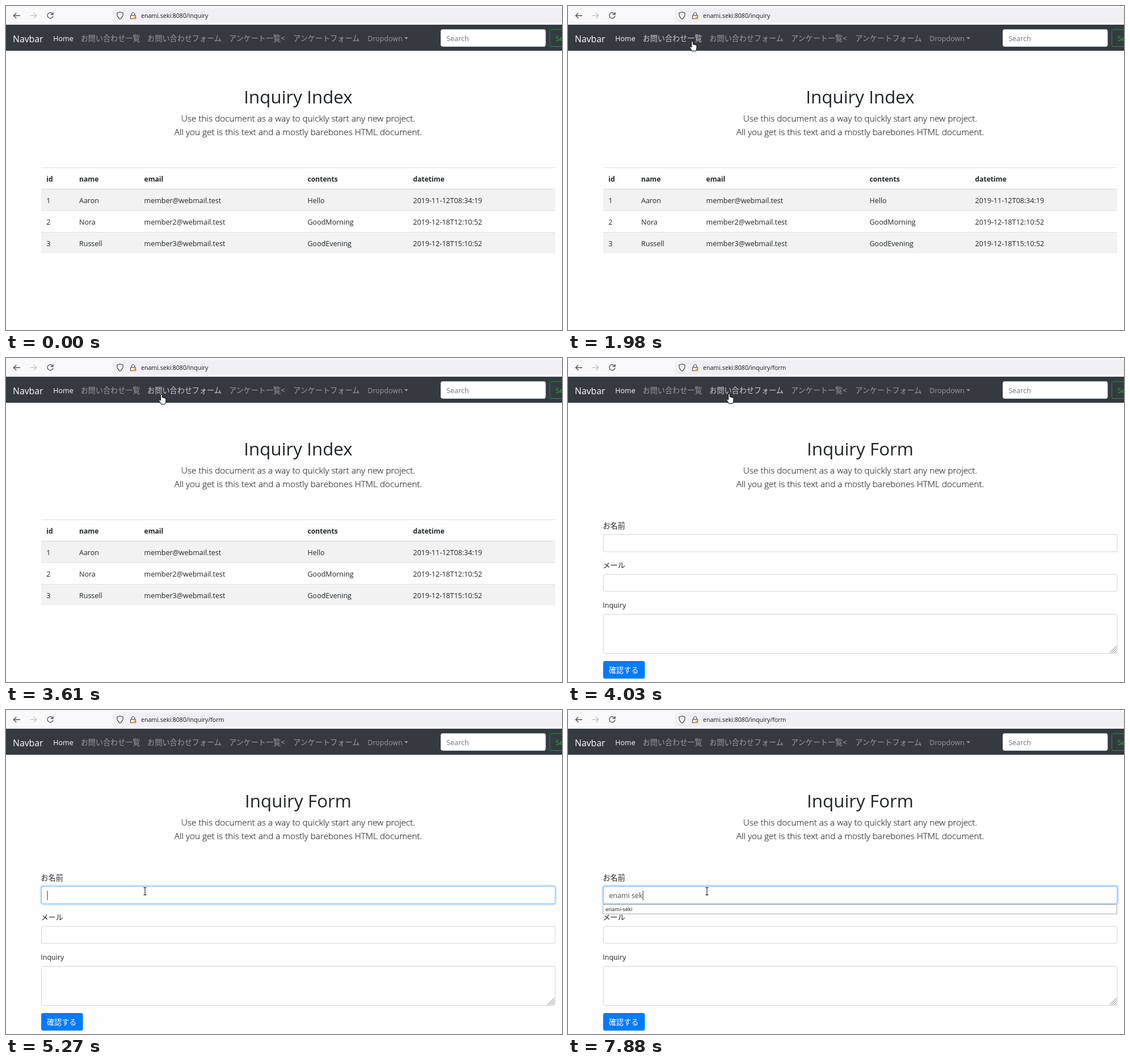
Write an HTML page that moves like this. It is 980 px wide and 572 px high and loops after 8 s.

```html
<!DOCTYPE html>
<html lang="ja">
<head>
<meta charset="utf-8">
<title>Inquiry</title>
<style>
  html, body { margin: 0; width: 100%; height: 100%; overflow: hidden; background: #fefefe; }
  svg { display: block; width: 980px; height: 572px; }
  text { font: 12.5px "Open Sans", "Noto Sans CJK JP", "Noto Sans CJK", sans-serif; fill: #212529; white-space: pre; }
  .jp { font-family: "Noto Sans CJK JP", "Noto Sans CJK", sans-serif; font-size: 13.1px; }
  .url { font-size: 10.6px; fill: #15141a; }
  .brand { font-size: 15.8px; font-weight: 500; fill: #fff; }
  .nav text { fill: #999ca0; }
  .nav .hover { fill: #cccecf; }
  .nav .active { font-weight: 500; fill: #fff; }
  .title { font-size: 31.3px; text-anchor: middle; }
  .lead { font-size: 15.35px; font-weight: 300; text-anchor: middle; stroke: #212529; stroke-width: .15; }
  .head { font-size: 12.1px; font-weight: 700; }
  .field { fill: #fff; stroke: #ced4da; }
  .icon { fill: none; stroke: #4d4d57; stroke-width: 1.3; stroke-linecap: round; stroke-linejoin: round; }
  .pointer { fill: #fff; stroke: #000; stroke-linejoin: round; }
</style>
</head>
<body>
<svg viewBox="0 0 980 572">
  <rect width="980" height="572" fill="#fefefe"/>

  <!-- browser toolbar -->
  <rect width="980" height="33" fill="#f9f9fb"/>
  <rect x="188" y="4" width="800" height="25" rx="3.5" fill="#f0f0f4"/>
  <g class="icon">
    <path d="M24.5 17H13.5M18 12.5L13.5 17L18 21.5"/>
    <path d="M43 17H54M49.5 12.5L54 17L49.5 21.5" stroke="#c3c3c8"/>
    <path d="M82.3 14.2A5 5 0 1 0 82.8 18M83 11.5V15H79.3"/>
    <path d="M201 10.5L206.3 12.3Q206.5 20 201 23Q195.5 20 195.7 12.3Z"/>
    <path d="M219.5 16.5H228.5V22.5H219.5ZM221.3 16.5V13.5Q224 9 226.7 13.5V16.5" stroke-width="1.1"/>
    <path d="M226.5 18.5L229.5 23H223.5Z" fill="#e8a33d" stroke="#e8a33d" stroke-width=".6"/>
  </g>
  <text class="url" id="url" x="238" y="20.7"></text>

  <!-- site navigation -->
  <rect y="33" width="980" height="46" fill="#343a40"/>
  <text class="brand" x="12" y="63.5">Navbar</text>
  <g class="nav">
    <text class="active" x="83.3" y="62">Home</text>
    <text class="jp" id="listLink" x="131.7" y="62">お問い合わせ一覧</text>
    <text class="jp" id="formLink" x="249.3" y="62">お問い合わせフォーム</text>
    <text class="jp" x="393" y="62">アンケート一覧&lt;</text>
    <text class="jp" x="506.3" y="62">アンケートフォーム</text>
    <text x="637.3" y="62">Dropdown</text>
    <path d="M702 55.3H709L705.5 58.8Z" fill="#999ca0"/>
  </g>
  <rect class="field" x="766.5" y="41.5" width="184.5" height="30" rx="3"/>
  <text x="776.5" y="62" style="fill:#6c757d">Search</text>
  <rect x="958.5" y="41.5" width="60" height="30" rx="3" fill="none" stroke="#28a745" stroke-width=".8"/>
  <text x="968.5" y="62" style="fill:#28a745">Search</text>

  <text class="title" id="title" x="515" y="171.5"></text>
  <text class="lead" x="515" y="203.5">Use this document as a way to quickly start any new project.</text>
  <text class="lead" x="515" y="228">All you get is this text and a mostly barebones HTML document.</text>

  <g id="table">
    <path d="M62 323h906v38.5h-906zM62 399h906v37.5h-906z" fill="#f2f2f2"/>
    <path d="M62 285.5H968M62 361.5H968M62 399.5H968" stroke="#dee2e6"/>
    <path d="M62 323.3H968" stroke="#dee2e6" stroke-width="1.6"/>
  </g>

  <g id="form">
    <text class="jp" x="61.5" y="300.5">お名前</text>
    <rect class="field" x="62.5" y="311.5" width="905.5" height="30.5" rx="3"/>
    <text class="jp" x="61.5" y="371">メール</text>
    <rect class="field" x="62.5" y="382" width="905.5" height="30" rx="3"/>
    <text x="61.3" y="441">Inquiry</text>
    <rect class="field" x="62.5" y="452.5" width="905.5" height="69" rx="3"/>
    <path d="M955 520.5L967 508.5M959 520.5L967 512.5M963 520.5L967 516.5" stroke="#666"/>
    <rect x="62" y="535" width="73.5" height="31" rx="3.3" fill="#007bff"/>
    <text class="jp" x="72" y="556" style="fill:#fff">確認する</text>
    <g id="focus" fill="none">
      <rect x="61" y="310" width="908.5" height="33.5" rx="4.5" stroke="#bfdeff" stroke-width="2.4"/>
      <rect x="62.5" y="311.5" width="905.5" height="30.5" rx="3" stroke="#80bdff"/>
    </g>
    <text id="typed" x="72.3" y="332" style="fill:#495057"></text>
    <rect id="caret" y="319" width="1" height="17" fill="#333"/>
    <g id="suggestion">
      <rect x="61.5" y="343.5" width="906" height="16.5" fill="#fff" stroke="#a9a9ae"/>
      <text x="66" y="355.3" style="font-size:9.4px;fill:#111">enami-seki</text>
    </g>
  </g>

  <g id="cursor">
    <path id="arrow" class="pointer" d="M0 0V14L3.3 11L5.5 16.5L7.8 15.5L5.5 10.3H10Z"/>
    <path id="hand" class="pointer" d="M-1.4 1.2Q0 -.8 1.4 1.2V6Q2.5 5 3.9 6.4Q5.2 5.6 6.1 7Q7.6 6.6 7.9 8.3V12Q7.8 15 6.2 17.5H-.6Q-2 14 -4.3 11.4Q-5 9.4 -3 9.6L-1.4 11Z"/>
    <path id="beam" d="M-2.5 -6.5H2.5M0 -6.5V6.5M-2.5 6.5H2.5" stroke="#000"/>
  </g>
</svg>

<script>
  const LOOP = 8000;
  const FORM_OPENS = 3890;
  const $ = id => document.getElementById(id);
  const show = (id, visible) => $(id).style.display = visible ? '' : 'none';
  const setText = (id, value) => { if ($(id).textContent !== value) $(id).textContent = value; };
  const clamp = v => Math.min(1, Math.max(0, v));

  const columns = [71.3, 129, 243.5, 531.5, 717.5];
  const rows = [
    ['id', 'name', 'email', 'contents', 'datetime'],
    ['1', 'Aaron', 'member@webmail.test', 'Hello', '2019-11-12T08:34:19'],
    ['2', 'Nora', 'member2@webmail.test', 'GoodMorning', '2019-12-18T12:10:52'],
    ['3', 'Russell', 'member3@webmail.test', 'GoodEvening', '2019-12-18T15:10:52']
  ];
  rows.forEach((cells, row) => cells.forEach((value, col) => {
    const cell = document.createElementNS('http://www.w3.org/2000/svg', 'text');
    cell.setAttribute('x', columns[col]);
    cell.setAttribute('y', 310 + row * 37.9);
    if (row === 0) cell.setAttribute('class', 'head');
    cell.textContent = value;
    $('table').append(cell);
  }));

  // [time, x, y] of the mouse hot spot
  const mousePath = [
    [720, 508, 538], [1490, 226, 75], [1980, 219, 62], [3400, 219, 62], [3610, 274, 64],
    [3750, 284, 63], [4360, 284, 63], [4920, 237, 321], [5130, 245, 320]
  ];
  const name = 'enami sek';
  const keyTimes = [6550, 6690, 6820, 6890, 7020, 7280, 7680, 7820, 7880];

  function mouseAt(t) {
    const next = mousePath.findIndex(key => key[0] > t);
    if (next < 0) return mousePath.at(-1).slice(1);
    const [t0, x0, y0] = mousePath[Math.max(0, next - 1)];
    const [t1, x1, y1] = mousePath[next];
    const p = t1 > t0 ? clamp((t - t0) / (t1 - t0)) : 0;
    const eased = p * p * (3 - 2 * p);
    return [x0 + (x1 - x0) * eased, y0 + (y1 - y0) * eased];
  }

  function drawMouse(t, onForm) {
    const [x, y] = mouseAt(t);
    const overNav = y > 40 && y < 74;
    const overList = overNav && x > 125 && x < 243;
    const overForm = overNav && x >= 243 && x < 387;
    const overLink = overList || overForm;
    const overInput = onForm && y > 311;
    $('listLink').classList.toggle('hover', overList);
    $('formLink').classList.toggle('hover', overForm);
    show('cursor', t >= mousePath[0][0]);
    show('hand', overLink);
    show('beam', overInput);
    show('arrow', !overLink && !overInput);
    $('cursor').setAttribute('transform', `translate(${x} ${y})`);
  }

  function drawInput(t) {
    $('focus').style.opacity = clamp((t - 5150) / 150);
    setText('typed', name.slice(0, keyTimes.filter(k => t >= k).length));
    $('caret').setAttribute('x', 72.5 + $('typed').getComputedTextLength());
    show('caret', t >= 5200 && !(t >= 5690 && t < 6220));
    show('suggestion', t >= 6620);
  }

  function draw(t) {
    const onForm = t >= FORM_OPENS;
    setText('url', 'enami.seki:8080/inquiry' + (onForm ? '/form' : ''));
    setText('title', onForm ? 'Inquiry Form' : 'Inquiry Index');
    show('table', !onForm);
    show('form', onForm);
    if (onForm) drawInput(t);
    drawMouse(t, onForm);
  }

  const start = performance.now();
  function tick() {
    draw((performance.now() - start) % LOOP);
    requestAnimationFrame(tick);
  }
  tick();
</script>
</body>
</html>
```
